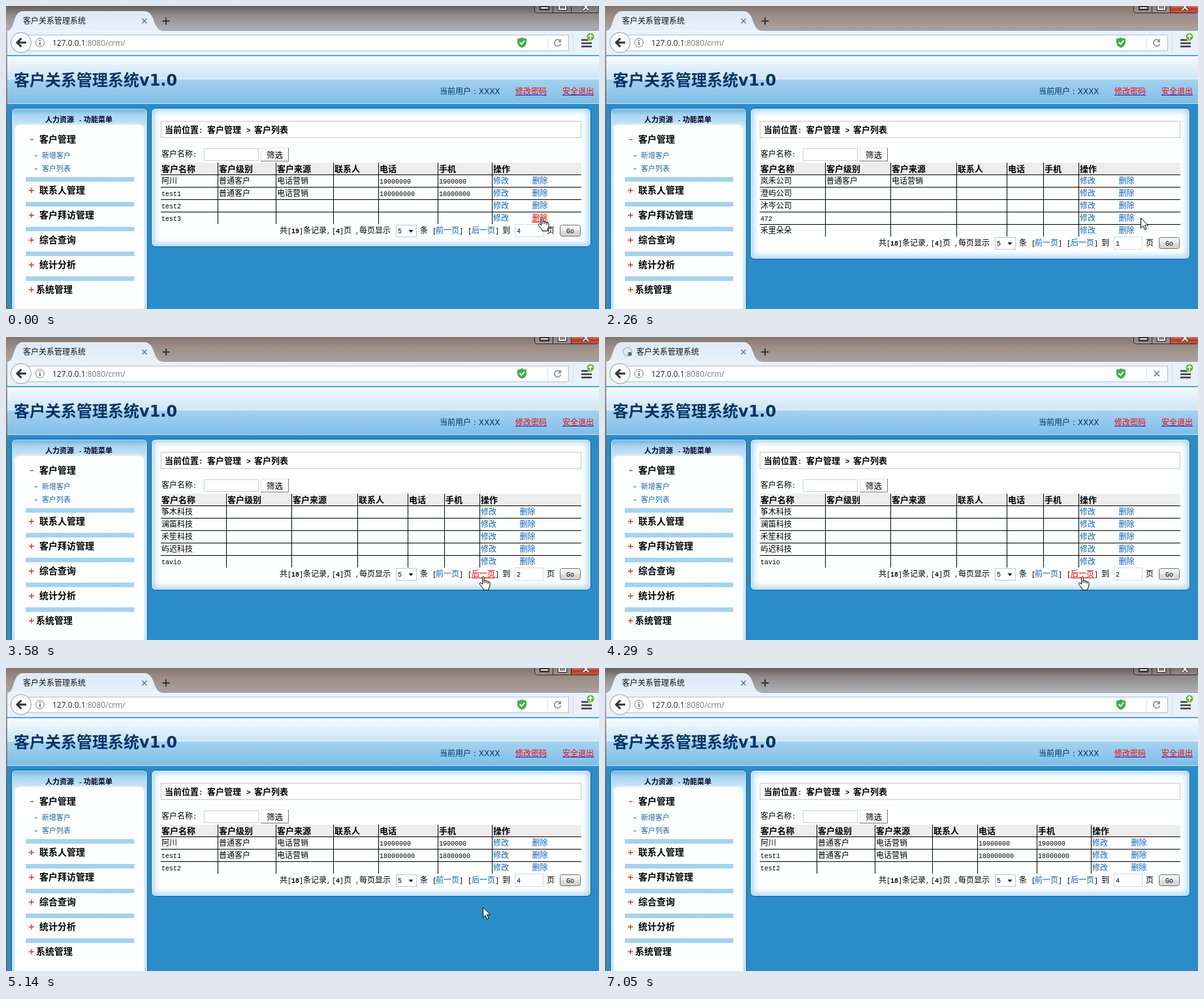
These frames come from a looping animation (908x464 px, 7180 ms). An HTML page:

```html
<!DOCTYPE html>
<html lang="zh-CN">
<head>
<meta charset="utf-8">
<title>客户关系管理系统</title>
<style>
html, body { margin: 0; width: 100%; height: 100%; overflow: hidden; background: #2a8dc9; }
#stage { position: absolute; left: 0; top: 0; width: 908px; height: 464px; overflow: hidden; background: #2a8dc9; }
#stage > * { position: absolute; box-sizing: border-box; }
#strip { left: 0; top: 0; width: 908px; height: 464px; background: linear-gradient(#625e5c, #8f8c8b 14px, #aeb0b4 37px, #6a6664 180px); }
#strip.on { background: linear-gradient(#83766f, #9a8c84 14px, #aba29d 37px, #6a6664 180px); }
#page { left: 2px; top: 76px; width: 906px; height: 388px; background: linear-gradient(#2583c0, #2a8dc9 80px); }
#head { left: 2px; top: 75px; width: 906px; height: 75px; border-bottom: 1px solid #c6e3f5;
  background: linear-gradient(#4aa6de 0 2px, #fff 2px 5px, #f0f8fd 6px, #cfe6f6 34px, #dcedf9 37px, #a4d1ef 38px, #80bfe7 73px); }
.box { border: 1px solid #0a5c99; border-radius: 7px; background: #fdfefe;
  box-shadow: inset 0 0 0 1px #cde8f8, inset 0 0 10px 4px #a6d4f1; }
#side { left: 8px; top: 156px; width: 209px; height: 309px; border-radius: 7px 7px 0 0; }
#cap { left: 10px; top: 158px; width: 205px; height: 28px; border-radius: 5px 5px 0 0; background: linear-gradient(#6fb5e2, #a9d4f0 9px, #cfe7f7); }
#body { left: 14px; top: 182px; width: 197px; height: 290px; border-radius: 7px 7px 0 0; background: #fdfefe; box-shadow: 0 0 4px 1px #e7f4fc; }
#panel { left: 222px; top: 156px; width: 674px; }
.bars { left: 30px; width: 166px; height: 7px; background: repeating-linear-gradient(90deg, #e2f2fb 0 1px, #68b4e0 1px 2px); }
svg { left: 0; top: 0; }
text { font-family: "Noto Sans CJK SC", "Noto Sans CJK", sans-serif; white-space: pre; }
.mono { font-family: "Liberation Mono", monospace; }
.ui { font-family: "DejaVu Sans", sans-serif; }
.url { font-family: "Open Sans", sans-serif; }
.hot { fill: #e00000; text-decoration: underline; }
</style>
</head>
<body>
<div id="stage">
  <div id="strip"></div>
  <div id="page"></div>
  <div id="side" class="box"></div>
  <div id="cap"></div>
  <div id="body"></div>
  <div id="panel" class="box"></div>
  <svg id="art" width="908" height="464">
    <defs>
      <linearGradient id="tab" x2="0" y2="1"><stop stop-color="#dce9f6"/><stop offset="1" stop-color="#e8f1fa"/></linearGradient>
      <linearGradient id="btn" x2="0" y2="1"><stop stop-color="#f6f6f6"/><stop offset=".5" stop-color="#ebebeb"/><stop offset=".5" stop-color="#dedede"/><stop offset="1" stop-color="#d0d0d0"/></linearGradient>
      <linearGradient id="red" x2="0" y2="1"><stop stop-color="#d98476"/><stop offset=".5" stop-color="#b7392a"/><stop offset="1" stop-color="#cf5a40"/></linearGradient>
    </defs>
    <g id="chrome">
      <path d="M809.5 -4V7Q809.5 10.5 813.5 10.5H904Q908 10.5 908 7V-4M837.5 0V10M865.5 0V10" fill="#fff" fill-opacity=".1" stroke="#2d2928"/>
      <path id="close" d="M866 -1H908V7Q908 10 904 10H866Z" fill="url(#red)"/>
      <path d="M818.500 1H830.500V5H818.500ZM846.500 -3V5.500H857.500V-3M883 -3L893 7M893 -3L883 7" fill="none" stroke="#3a3534" stroke-width="3.500"/>
      <path d="M819 3H830M847 -3V5H857V-3M883.500 -3L892.500 6.500M892.500 -3L883.500 6.500" fill="none" stroke="#f4f4f4" stroke-width="2"/>
      <rect x="2" y="37" width="906" height="38" fill="#e8f1fa"/>
      <path d="M2 37.500H908" stroke="#8e9cab"/>
      <path d="M2 38.500C15 37 10 8.500 26 8.500H212C229 8.500 223 37 240 38.500Z" fill="url(#tab)" stroke="#f3f8fd"/>
      <path d="M208.500 19.500L215.500 26.500M215.500 19.500L208.500 26.500" stroke="#747c85" stroke-width="1.700"/>
      <path d="M239.500 23H250.500M245 17.500V28.500" stroke="#34312f" stroke-width="2"/>
      <rect x="30.500" y="44.500" width="831" height="24" fill="#fff" stroke="#b3bfcc"/>
      <circle cx="23" cy="56" r="15.500" fill="#f9fbfe" stroke="#909ba8"/>
      <path d="M31 56H18M23.500 49.500L17 56L23.500 62.500" fill="none" stroke="#333" stroke-width="3"/>
      <circle cx="52" cy="56" r="6.500" fill="none" stroke="#777"/>
      <path d="M52 52V53.800M52 55V60" stroke="#666" stroke-width="1.700"/>
      <path d="M783 50Q787 50 790 48Q793 50 797 50V56Q797 61 790 64Q783 61 783 56Z" fill="#42ae4c"/>
      <path d="M786.500 55.500L789.500 58.500L794 53" fill="none" stroke="#fff" stroke-width="1.800"/>
      <path d="M829.500 48V65M868.500 42V71" stroke="#d3dbe4"/>
      <g id="reload"><path d="M848.500 53A5 5 0 1 0 849.500 58" fill="none" stroke="#8a8f96" stroke-width="1.800"/><path d="M850 50V55.500H844.500Z" fill="#8a8f96"/></g>
      <path id="stop" d="M841 52L849 60M849 52L841 60" stroke="#858b93" stroke-width="1.800"/>
      <path d="M881 52H897M881 57H897M881 62H897" stroke="#3c3c3c" stroke-width="2.600"/>
      <circle cx="895" cy="47" r="6" fill="#62b332" stroke="#f3f8ee"/>
      <path d="M895 51V44M892 47L895 44L898 47" fill="none" stroke="#fff" stroke-width="1.700"/>
      <g id="spin"><circle cx="34.500" cy="22.500" r="6.500" fill="none" stroke="#b5bdc6" stroke-width="1.500"/><circle cx="38" cy="26" r="3" fill="#5d656e"/></g>
    </g>
    <g id="fixed"></g>
    <g id="pages"></g>
    <g id="cursor" stroke="#000">
      <path id="arrow" d="M.5 .5V16L4 12.700L6.500 18.500L9 17.500L6.500 11.800H11.500Z" fill="#fff"/>
      <path id="hand" transform="translate(-5)" d="M4.500 1.500Q5.500 -.3 7 1.500V7Q9.500 5.500 10 8Q12.500 6.500 13 9Q15.800 8 16 10.500V14Q16 17 14 19V21.500H6V19.500L1 13.500Q-.5 11.500 1 10.500Q2.500 10 4.500 12.500ZM7 7V11M10 8V11M13 9V12" fill="#fff"/>
      <path id="beam" d="M-3.500 -8H-1.500L0 -7L1.500 -8H3.500M0 -7V7M-3.500 8H-1.500L0 7L1.500 8H3.500" fill="none"/>
    </g>
  </svg>
</div>
<script>
const $ = id => document.getElementById(id);
const LOOP = 7180, BLUE = '#0a62b8', NAVY = '#003366';

function add(parent, tag, attrs, str) {
  const node = document.createElementNS('http://www.w3.org/2000/svg', tag);
  for (const k in attrs) node.setAttribute(k, attrs[k]);
  if (str) node.textContent = str;
  parent.append(node);
  return node;
}

// Adds a plain block below the drawing.
function block(props, top) {
  const div = Object.assign(document.createElement('div'), props);
  if (top) div.style.top = top + 'px';
  $('stage').insertBefore(div, $('art'));
}

// Text centred on line y; Latin runs are half as wide as the Chinese characters.
function label(g, x, y, str, { size = 12, fill = '#000', bold = false, latin = 'mono' } = {}) {
  const t = add(g, 'text', { x, y: y + size * .36, fill, 'font-size': size, 'font-weight': bold ? 700 : 400 });
  for (const run of str.match(/[ -~]+|[^ -~]+/g)) {
    const ascii = /[ -~]/.test(run[0]);
    const attrs = ascii ? { class: latin } : {};
    if (ascii && latin === 'mono') attrs['font-size'] = size * 5 / 6;
    add(t, 'tspan', attrs, run);
  }
  return t;
}
const rect = (g, x, y, width, height, fill, stroke, rx = 0) =>
  add(g, 'rect', { x: x + .5, y: y + .5, width: width - 1, height: height - 1, fill, stroke, rx });
const lines = (g, d, stroke = '#000') => add(g, 'path', { d, stroke, fill: 'none' });

// Browser text, page header and menu
const fixed = $('fixed');
block({ id: 'head' });
const title = label(fixed, 0, 22.5, '客户关系管理系统', { fill: '#111' });
add(fixed, 'text', { x: 71, y: 60.5, class: 'url', 'font-size': 12, fill: '#222' }, '127.0.0.1');
add(fixed, 'text', { x: 121.5, y: 60.5, class: 'url', 'font-size': 12, fill: '#777' }, ':8080/crm/');
label(fixed, 12, 113.5, '客户关系管理系统v1.0', { size: 24, fill: NAVY, bold: true, latin: 'ui' });
label(fixed, 664, 130.5, '当前用户 : XXXX', { fill: NAVY, latin: 'ui' });
[[780, '修改密码'], [852, '安全退出']].forEach(([x, s]) => {
  label(fixed, x, 130.5, s, { fill: '#f00' });
  lines(fixed, `M${x} 136.5h48`, '#2020d8');
});

[[60, '人力资源'], [111, '-'], [119, '功能菜单']].forEach(([x, s]) =>
  label(fixed, x, 174, s, { size: 11, fill: '#002', bold: true }));
['客户管理', '联系人管理', '客户拜访管理', '综合查询', '统计分析', '系统管理'].forEach((name, i) => {
  const y = i ? 244 + 38 * i : 204;
  label(fixed, i === 5 ? 46 : 51, y, name, { size: 14, bold: true });
  lines(fixed, i ? `M35 ${y + .5}h8m-4 -4v8` : `M37 ${y + .5}h5`, '#e8300c').setAttribute('stroke-width', 1.4);
  if (i) block({ className: 'bars' }, y - 20);
});
['新增客户', '客户列表'].forEach((s, i) => {
  label(fixed, 55, 229 + 20 * i, s, { size: 11, fill: '#1a66a8' });
  lines(fixed, `M44 ${229.5 + 20 * i}h4`, '#1a66a8');
});

rect(fixed, 237, 176, 644, 26, '#fff', '#c6c6c6');
[[243, '当前位置:'], [308, '客户管理'], [368, '>'], [380, '客户列表']].forEach(([x, s]) =>
  label(fixed, x, 189, s, { size: 13, bold: true }));
label(fixed, 238, 227, '客户名称:');
rect(fixed, 303, 218, 84, 19, '#fff', '#c9ced3');
rect(fixed, 390, 217, 43, 21, '#fcfcfc', '#e6e6e6');
lines(fixed, 'M390 237.5H432.5V217', '#777');
label(fixed, 399, 228, '筛选', { size: 12.5 });

// Customer tables
const HEADS = ['客户名称', '客户级别', '客户来源', '联系人', '电话', '手机', '操作'];
const WIDE = [324, 413, 501, 570, 661, 744];
const PLAIN = [337, 437, 538, 615, 671, 725];
const FULL = [323, 410, 498, 565, 655, 746];
const N = '普通客户', T = '电话营销';
const last = [
  ['阿川', N, T, '', '19000000', '1900000'],
  ['test1', N, T, '', '180000000', '18000000'],
  ['test2']
];
const tables = [
  { rules: WIDE, total: 19, no: 4, hot: 3, rows: [...last, ['test3']] },
  { rules: PLAIN, total: 18, no: 1, rows: [['岚禾公司', N, T], ['澄屿公司'], ['沐岑公司'], ['472'], ['禾里朵朵']] },
  { rules: PLAIN, total: 18, no: 2, rows: [['筝木科技'], ['澜笛科技'], ['禾笙科技'], ['屿迟科技'], ['tavio']] },
  { rules: FULL, total: 18, no: 3, rows: [
    ['小桐公司', N, T, '', '170000000', '170000000'],
    ['小桐公司', N, T, '', '170000000', '170000000'],
    ['消息公司', '', '网络营销', '', '18000', '1800'],
    ['嘎嘎嘎', N, T, '', '18888', '88888'],
    ['xxx', N, '推广活动', '', '180000000', '18000000']] },
  { rules: WIDE, total: 18, no: 4, rows: last }
];

function pager(g, y, { total, no }) {
  label(g, 419, y, '共[');
  label(g, 437, y, String(total), { bold: true });
  label(g, 449, y, ']条记录,');
  label(g, 499, y, '[');
  label(g, 505, y, '4', { bold: true });
  label(g, 511, y, ']页');
  label(g, 535, y, ',每页显示');
  rect(g, 597, y - 9, 32, 19, '#fff', '#b5c7d6');
  label(g, 600, y, '5');
  add(g, 'path', { d: `M616.500 ${y - 1}h7l-3.500 4z`, fill: '#111' });
  label(g, 634, y, '条');
  label(g, 653, y, '[');
  label(g, 658, y, '前一页', { fill: BLUE });
  label(g, 694, y, ']');
  label(g, 707, y, '[');
  const next = label(g, 713, y, '后一页', { fill: BLUE });
  label(g, 749, y, ']');
  label(g, 760, y, '到');
  const field = rect(g, 779, y - 10, 44, 20, '#fff', '#cbdbe7');
  label(g, 782, y, String(no));
  label(g, 828, y, '页');
  rect(g, 848, y - 9, 32, 18, 'url(#btn)', '#707070', 3);
  label(g, 858, y, 'Go');
  return { next, field };
}

const pages = tables.map(table => {
  const { rules, rows, hot } = table, n = rows.length;
  const g = add($('pages'), 'g', {});
  const xs = [238, ...rules.map(x => x + 2)], end = 258 + 19 * n;
  add(g, 'rect', { x: 237, y: 240, width: 644, height: 18, fill: '#ededed' });
  lines(g, rules.map(x => `M${x + .5} 240V${end}`).join(''));
  lines(g, rows.map((r, i) => `M237 ${258.5 + 19 * i}H881`).join(''));
  HEADS.forEach((s, i) => label(g, xs[i], 249, s, { size: 13, bold: true }));
  rows.forEach((row, i) => {
    const y = 268 + 19 * i;
    row.forEach((s, c) => s && label(g, xs[c], y, s));
    label(g, xs[6], y, '修改', { fill: BLUE });
    const del = label(g, xs[6] + 59.5, y, '删除', { fill: BLUE });
    if (i === hot) del.setAttribute('class', 'hot');
  });
  return { g, height: 137 + 19 * n, ...pager(g, 268 + 19 * n, table) };
});

// Each step changes only what it names.
const steps = [
  [0, { page: 0, on: false, load: false, next: false, field: false, cursor: 'hand', x: 820, y: 323 }],
  [1990, { on: true }],
  [2110, { load: true }],
  [2260, { page: 1, load: false, cursor: 'arrow', y: 324 }],
  [2720, { cursor: 'beam', x: 805.5, y: 365.5 }],
  [2870, { field: true, x: 777.5, y: 366.5 }],
  [3030, { field: false, next: true, cursor: 'hand', x: 737, y: 366 }],
  [3170, { x: 730 }],
  [3420, { load: true }],
  [3580, { page: 2, load: false }],
  [4290, { load: true }],
  [4440, { page: 3, load: false }],
  [4990, { load: true, cursor: 'arrow' }],
  [5140, { page: 4, load: false, next: false }],
  [5640, { x: 729, y: 370 }],
  [5790, { x: 732, y: 442 }],
  [5910, { cursor: '' }],
  [7050, { on: false }]
];

const show = (node, yes) => { node.style.display = yes ? '' : 'none'; };

function render(time) {
  const s = {};
  for (const [at, change] of steps) if (at <= time) Object.assign(s, change);
  pages.forEach((p, i) => show(p.g, i === s.page));
  const p = pages[s.page];
  $('panel').style.height = p.height + 'px';
  p.next.setAttribute('class', s.next ? 'hot' : '');
  p.field.setAttribute('stroke', s.field ? '#5e9fd0' : '#cbdbe7');
  $('strip').className = s.on ? 'on' : '';
  show($('close'), s.on);
  show($('spin'), s.load);
  show($('stop'), s.load);
  show($('reload'), !s.load);
  title.setAttribute('x', s.load ? 48 : 26);
  ['arrow', 'hand', 'beam'].forEach(id => show($(id), id === s.cursor));
  $('cursor').setAttribute('transform', `translate(${s.x} ${s.y})`);
}

const start = performance.now();
function tick() {
  render((performance.now() - start) % LOOP);
  requestAnimationFrame(tick);
}
tick();
</script>
</body>
</html>
```
